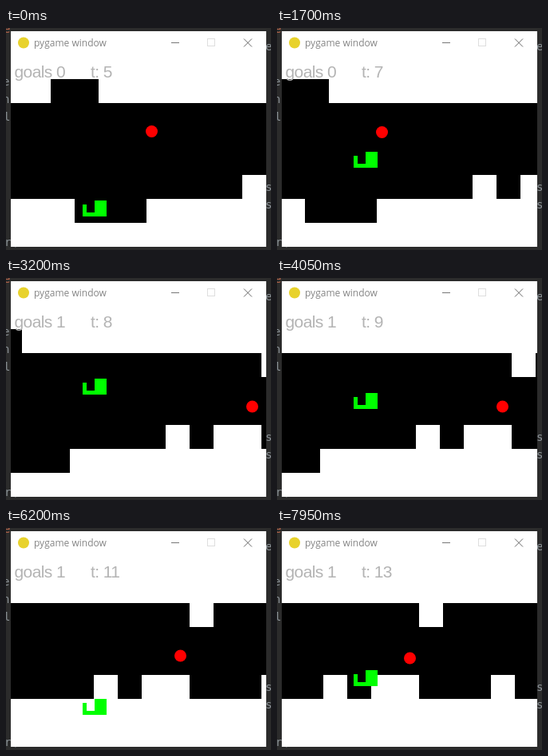
Recreate the animation shown at these times as an HTML page. Size 332x278 px, loop 8 s.

```html
<!DOCTYPE html>
<html lang="en">
<head>
<meta charset="utf-8">
<title>pygame window</title>
<style>
  html, body { margin: 0; width: 100%; height: 100%; overflow: hidden; background: #2b2b2b; }
  svg { display: block; width: 332px; height: 278px; }
  .code { font: 14px "DejaVu Sans Mono", monospace; fill: #8d9499; }
  .title { font: 12px "Open Sans", sans-serif; fill: #858585; }
  .score { font: 21px "Arial Narrow", "Liberation Sans Narrow", "Liberation Sans", sans-serif; letter-spacing: -.6px; fill: #b4b4b4; }
</style>
</head>
<body>
<svg viewBox="0 0 332 278">
  <defs><clipPath id="view"><rect x="6" y="34" width="320" height="240"/></clipPath></defs>
  <rect width="332" height="278" fill="#2b2b2b"/>
  <g class="code">
    <text x="-3" y="6" fill="#b5654a">e</text>
    <text x="-4" y="72">e</text>
    <text x="-4" y="94">n</text>
    <text x="-3" y="116">l</text>
    <text x="-2" y="273">r(</text>
    <text x="325" y="28">e</text>
    <text x="325" y="204">s</text>
    <text x="325" y="226">s</text>
  </g>
  <rect x="6" y="4" width="320" height="270" fill="#fff"/>
  <circle cx="22" cy="18.5" r="7" fill="#e8d22c"/>
  <text class="title" x="35" y="23">pygame window</text>
  <g fill="none">
    <path d="M207 18.5h10" stroke="#777"/>
    <rect x="252.5" y="13.5" width="9" height="9" stroke="#dedede"/>
    <path d="M298 13.5l10 10m0-10l-10 10" stroke="#666"/>
  </g>
  <g clip-path="url(#view)">
    <rect x="6" y="94" width="320" height="120"/>
    <g id="cave" shape-rendering="crispEdges">
      <path d="M56 64h60v30h-60z M86 214h90v30h-90z"/>
      <path fill="#fff" d="M296 184h30v30h-30z M356 184h60v30h-60z M416 94h30v30h-30z M506 184h30v30h-30z"/>
    </g>
    <circle id="ball" r="7.5" fill="#f00"/>
    <path id="heli" d="M96 5h5v10h10v-15h15v20h-30z" fill="#0f0" shape-rendering="crispEdges"/>
  </g>
  <text id="goals" class="score" x="10.5" y="62"></text>
  <text id="clock" class="score" x="106" y="62"></text>
</svg>
<script>
const LOOP = 8000, STEP = 50, PICKUP = 2100, TICK = 550;
const [cave, ball, heli, goals, clock] =
  ['cave', 'ball', 'heli', 'goals', 'clock'].map(id => document.getElementById(id));

// [ms, y] pairs
const flight = [[0, 216], [550, 206], [1100, 185], [1700, 155], [2350, 127], [2900, 123],
  [4050, 144], [5050, 148], [5600, 175], [6200, 214], [6500, 218], [7250, 216],
  [7650, 210], [7950, 178]];
const bob = [[0, 129.5], [1100, 130.5], [2200, 130.5], [2300, 161], [5050, 161], [6200, 160], [7950, 163]];

// Smooth curve that never overshoots its keys
function curve(keys, t) {
  let i = 0;
  while (i < keys.length - 2 && t > keys[i + 1][0]) i++;
  const slope = k => (keys[k + 1][1] - keys[k][1]) / (keys[k + 1][0] - keys[k][0]);
  const tangent = k => {
    if (k === 0 || k === keys.length - 1) return slope(Math.min(k, keys.length - 2));
    const a = slope(k - 1), b = slope(k);
    return a * b > 0 ? 2 * a * b / (a + b) : 0;
  };
  const [t0, y0] = keys[i], [t1, y1] = keys[i + 1];
  const d = t1 - t0, u = Math.min(1, (t - t0) / d), v = 1 - u;
  return v * v * (1 + 2 * u) * y0 + u * u * (3 - 2 * u) * y1
    + d * u * v * (v * tangent(i) - u * tangent(i + 1));
}

function draw(time) {
  const t = Math.floor(time % LOOP / STEP) * STEP;
  const scroll = Math.ceil(t * 0.02993);
  const scored = t >= PICKUP;
  cave.setAttribute('transform', `translate(${-scroll} 0)`);
  ball.setAttribute('cx', (scored ? 404.5 : 182.5) - scroll);
  ball.setAttribute('cy', curve(bob, t));
  heli.setAttribute('transform', `translate(0 ${Math.round(curve(flight, t))})`);
  goals.textContent = `goals ${scored ? 1 : 0}`;
  clock.textContent = `t: ${6 + Math.floor((t - TICK) / 1000)}`;
}

const start = performance.now();
function frame() {
  draw(performance.now() - start);
  requestAnimationFrame(frame);
}
frame();
</script>
</body>
</html>
```
